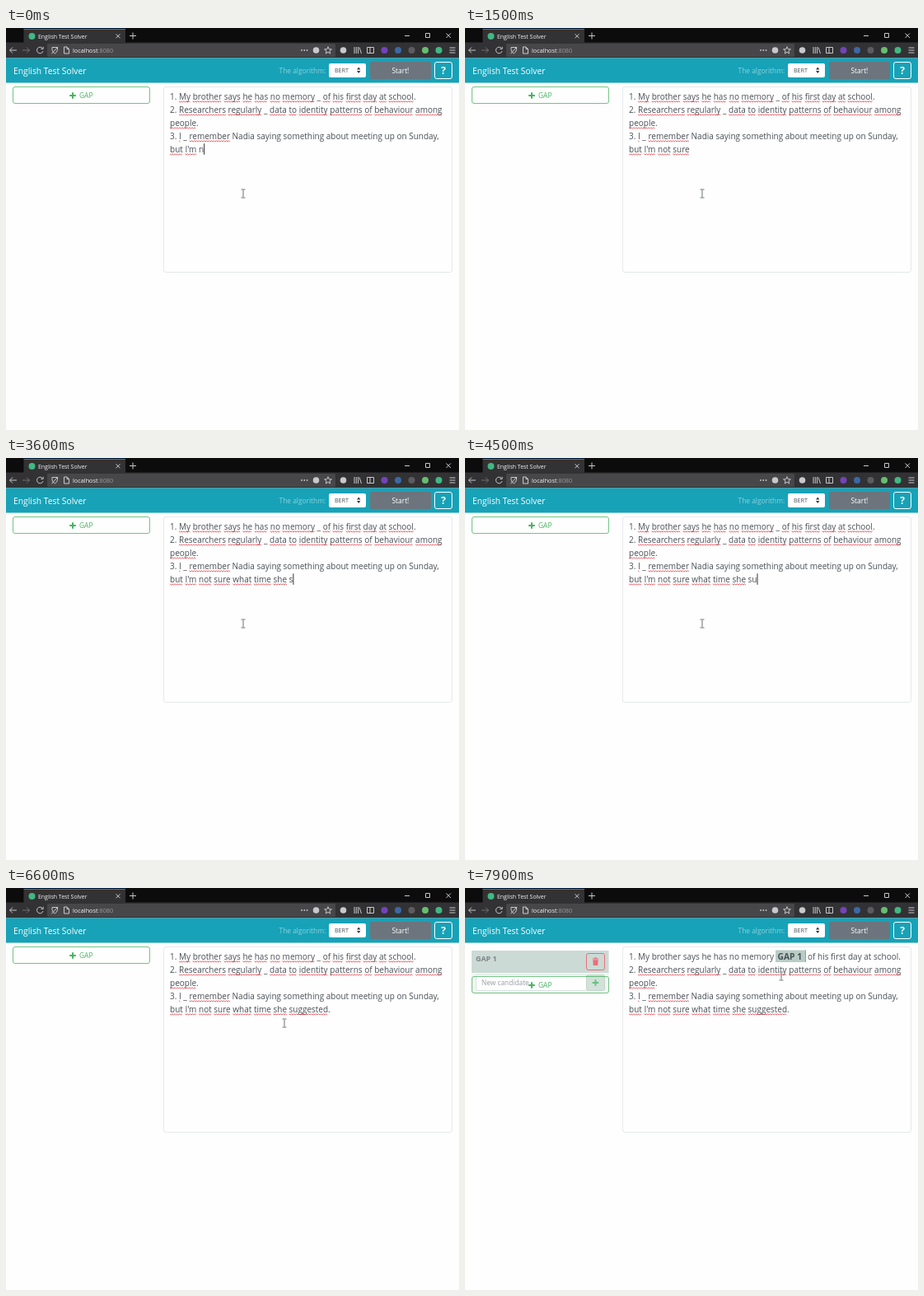
An HTML page for the animation above (8 s loop, 550 by 488 pixels).

```html
<!DOCTYPE html>
<html lang="en">
<head>
<meta charset="utf-8">
<title>English Test Solver</title>
<style>
html, body { margin: 0; width: 100%; height: 100%; overflow: hidden; background: #fefefe; }
svg { display: block; }
text { font-family: "Open Sans", "Noto Sans", sans-serif; white-space: pre; }
.note { font-size: 10px; fill: #495057; }
.bold { font-weight: 700; }
.line { fill: none; stroke: #c8c8cc; }
.wave { fill: none; stroke: #e8323c; stroke-width: .8; }
</style>
</head>
<body>
<svg width="550" height="488" viewBox="0 0 550 488">
  <defs>
    <path id="plus" d="M-3.8 -1H-1V-3.8H1V-1H3.8V1H1V3.8H-1V1H-3.8Z" fill="#28a745"/>
  </defs>
  <rect width="550" height="488" fill="#fefefe"/>

  <!-- browser -->
  <rect width="550" height="18" fill="#0c0c0d"/>
  <rect y="17.5" width="550" height="19" fill="#323234"/>
  <rect x="21.5" y="1" width="123.5" height="17" fill="#323234"/>
  <rect x="21.5" y="1" width="123.5" height="1" fill="#0a84ff"/>
  <circle cx="31.5" cy="10" r="4" fill="#41b883"/>
  <text x="39" y="12.6" font-size="6.95" fill="#f4f4f6">English Test Solver</text>
  <path class="line" d="M133.5 7.3l5 5m0-5l-5 5M150 9.5h8m-4-4v8"/>
  <path class="line" d="M484 9.5h6M509.5 6.5h5v5h-5zM534.5 6.5l5.5 5.5m0-5.5l-5.5 5.5"/>
  <rect x="50" y="19" width="350" height="16" rx="1.5" fill="#474749"/>
  <path class="line" d="M13 27H4.5m3.5-3.5L4.5 27 8 30.5"/>
  <path class="line" opacity=".4" d="M20 27h8.5m-3.5-3.5l3.5 3.5-3.5 3.5"/>
  <path class="line" d="M44.3 24.6A3.8 3.8 0 1 0 45 28M45.2 22.8v2.6h-2.8"/>
  <path class="line" d="M56 23.5h6.5v3q-.5 3-3.2 4.5-2.8-1.5-3.3-4.5zM55.5 31.3l7.5-8.5"/>
  <path class="line" d="M70.5 23h3.5l2.5 2.5v5.5h-6zM74 23v2.5h2.5"/>
  <text x="81" y="29.6" font-size="7.3" fill="#f4f4f6">localhost<tspan fill="#99999b">:8080</tspan></text>
  <g fill="#c8c8cc">
    <circle cx="359" cy="27" r=".9"/><circle cx="362.3" cy="27" r=".9"/><circle cx="365.6" cy="27" r=".9"/>
    <circle cx="376.5" cy="27" r="3.8"/><circle cx="409.5" cy="27" r="3.8"/>
  </g>
  <path id="star" class="line"/>
  <path class="line" d="M423 23v8m2.3-8v8m2.3-8v8m1.4-7.5l2.5 7.5M438.500 23.500h8v7h-8zM442 23.500v7M538.500 24h7m-7 3h7m-7 3h7"/>
  <circle cx="459.5" cy="27" r="4" fill="#7443b8"/>
  <circle cx="476" cy="27" r="4" fill="#3c68a5"/>
  <circle cx="492.5" cy="27" r="4" fill="#5c5c60"/>
  <circle cx="509" cy="27" r="4" fill="#68bc71"/>
  <circle cx="525.5" cy="27" r="4" fill="#41b883"/>

  <!-- navigation -->
  <rect y="36.5" width="550" height="30" fill="#17a2b8"/>
  <text x="9" y="55.5" font-size="10.3" fill="#fff">English Test Solver</text>
  <text x="331.5" y="54.8" font-size="8.4" fill="#fff" opacity=".5">The algorithm:</text>
  <rect x="392" y="43" width="45" height="17" rx="2" fill="#fff"/>
  <text x="399" y="54.2" font-size="7.1" fill="#495057">BERT</text>
  <path d="M426 50.6l2.2-3 2.2 3zM426 52l2.2 3 2.2-3z" fill="#343a40"/>
  <rect x="442" y="41" width="74" height="21" rx="2.5" fill="#6c757d"/>
  <text x="468.5" y="54.6" font-size="8.4" fill="#fff">Start!</text>
  <rect x="520.5" y="41.5" width="21" height="20" rx="2.5" fill="none" stroke="#fff"/>
  <text class="bold" x="531" y="55.8" font-size="12" fill="#fff" text-anchor="middle">?</text>

  <!-- gap card -->
  <g id="card">
    <rect x="8" y="76" width="166.5" height="51" fill="#edf3f0"/>
    <rect x="8" y="76" width="166.5" height="27" fill="#b8ccc5"/>
    <text class="bold" x="13" y="89.2" font-size="8.9" fill="#495057">GAP 1</text>
    <rect x="147.5" y="79.5" width="22" height="20" rx="2.5" fill="none" stroke="#dc3545"/>
    <path d="M154.8 85.5h7.4v1h-7.4zM157 84.5h3v1h-3zM155.3 87.2h6.4l-.5 6.8h-5.4z" fill="#dc3545"/>
    <rect x="13.5" y="105.5" width="134" height="19" rx="2" fill="#fff" stroke="#ced4da"/>
    <text x="20" y="117.8" font-size="8.35" fill="#6c757d">New candidate</text>
    <rect x="147.5" y="105.5" width="22" height="19" rx="2" fill="#c3d4cc" stroke="#a9c9b5"/>
    <use href="#plus" x="158.5" y="115"/>
  </g>
  <g id="addButton">
    <rect x="8.5" y="71.5" width="166" height="20" rx="2.5" fill="none" stroke="#28a745" opacity=".65"/>
    <use href="#plus" x="81" y="82" opacity=".85"/>
    <text x="89" y="85.2" font-size="8.4" fill="#28a745" opacity=".85">GAP</text>
  </g>

  <!-- editor -->
  <rect x="191.5" y="71.5" width="350" height="225" rx="2.5" fill="none" stroke="#e6e9eb"/>
  <g id="gap">
    <rect x="377" y="75.5" width="37" height="14.5" fill="#b8ccc5"/>
    <path d="M413.5 75.5v14.5" stroke="#8fa39d"/>
    <text class="bold" x="379.5" y="86.8" font-size="10.3" fill="#495057">GAP 1</text>
  </g>
  <g id="editor"></g>
  <path id="caret" stroke="#333"/>
  <path id="pointer" d="M-2.5 -5H2.500M0 -5V5M-2.500 5H2.500" fill="none" stroke="#a2a5a8" stroke-width="1.6"/>
</svg>
<script>
const NS = "http://www.w3.org/2000/svg";
const LOOP = 8000, STEP = 100, LEFT = 199, TOP = 86.8, LEADING = 16;
const CLICK = 7100, INSERT = 7500, OPEN = 7700;
const START = "but I'm n", TYPED = "ot sure what time she suggested.";
// Key presses, in steps
const KEYS = [1, 3, 4, 5, 6, 7, 8, 9, 19, 21, 22, 23, 25, 28, 29, 30, 31, 31, 32, 32,
  33, 33, 34, 41, 46, 48, 50, 51, 53, 55, 56, 59];
const PATH = [[6200, 288, 201], [6600, 338, 164], [7000, 380, 86], [7300, 380, 86], [7600, 384, 107]];
const $ = id => document.getElementById(id);

function add(tag, attrs, content = "") {
  const el = document.createElementNS(NS, tag);
  for (const key in attrs) el.setAttribute(key, attrs[key]);
  el.textContent = content;
  return $("editor").appendChild(el);
}

function wave(x1, x2, y) {
  let d = `M${x1} ${y}`;
  for (let x = x1 + 1.5, up = true; x <= x2; x += 1.5, up = !up) d += `L${x} ${y + (up ? 1.2 : 0)}`;
  add("path", { class: "wave", d });
}

// Draws a line of text and marks its finished words, up to the given character
function write(row, content, x = LEFT, checked = content.length) {
  const y = TOP + row * LEADING;
  const el = add("text", { class: "note", x, y }, content);
  for (const word of content.matchAll(/[a-z']+(?=[ .])/gi)) {
    if (word.index >= checked) break;
    wave(el.getStartPositionOfChar(word.index).x,
      el.getEndPositionOfChar(word.index + word[0].length - 1).x, y + 2);
  }
  return el;
}

function pointerAt(t) {
  if (t <= PATH[0][0]) return PATH[0].slice(1);
  for (let i = 1; i < PATH.length; i++) {
    const [t0, x0, y0] = PATH[i - 1], [t1, x1, y1] = PATH[i];
    if (t <= t1) {
      const k = (t - t0) / (t1 - t0);
      return [x0 + (x1 - x0) * k, y0 + (y1 - y0) * k];
    }
  }
  return PATH[PATH.length - 1].slice(1);
}

function render(t) {
  const inserted = t >= INSERT, clicked = t >= CLICK;
  const count = KEYS.filter(k => k * STEP <= t).length;
  $("editor").replaceChildren();

  // Editing the first line clears its spelling marks
  const before = "1. My brother says he has no memory ", after = "of his first day at school.";
  const first = inserted ? write(0, before, LEFT, 0) : write(0, before + "_ " + after);
  if (inserted) write(0, after, 416, 0);
  write(1, "2. Researchers regularly _ data to identity patterns of behaviour among ");
  write(2, "people.");
  write(3, "3. I _ remember Nadia saying something about meeting up on Sunday,", LEFT, 15);
  const last = write(4, START + TYPED.slice(0, count));

  let caretX = LEFT + last.getComputedTextLength() + .5, row = 4;
  let since = count ? KEYS[count - 1] * STEP : 0;
  if (clicked) {
    row = 0;
    since = CLICK;
    caretX = first.getEndPositionOfChar(before.length - 1).x + 5;
  }
  $("caret").setAttribute("d", `M${caretX} ${TOP + row * LEADING - 10.5}v13.5`);
  $("caret").style.display = !inserted && (t - since) % 1000 < 500 ? "" : "none";

  $("gap").style.display = inserted ? "" : "none";
  $("pointer").setAttribute("transform", `translate(${pointerAt(t)})`);

  const open = Math.max(0, (t - OPEN) / 200);
  $("card").setAttribute("opacity", open * .7);
  $("addButton").setAttribute("transform", `translate(0 ${36 * open})`);
}

$("star").setAttribute("d", "M" + Array.from({ length: 10 }, (_, i) => {
  const r = i % 2 ? 2 : 4.6, a = i * Math.PI / 5;
  return `${391 + r * Math.sin(a)} ${27.3 - r * Math.cos(a)}`;
}).join("L") + "Z");

const begin = performance.now();
let shown = -1;
function tick() {
  const t = Math.floor((performance.now() - begin) % LOOP / STEP) * STEP;
  if (t !== shown) render(shown = t);
  requestAnimationFrame(tick);
}
tick();
</script>
</body>
</html>
```
